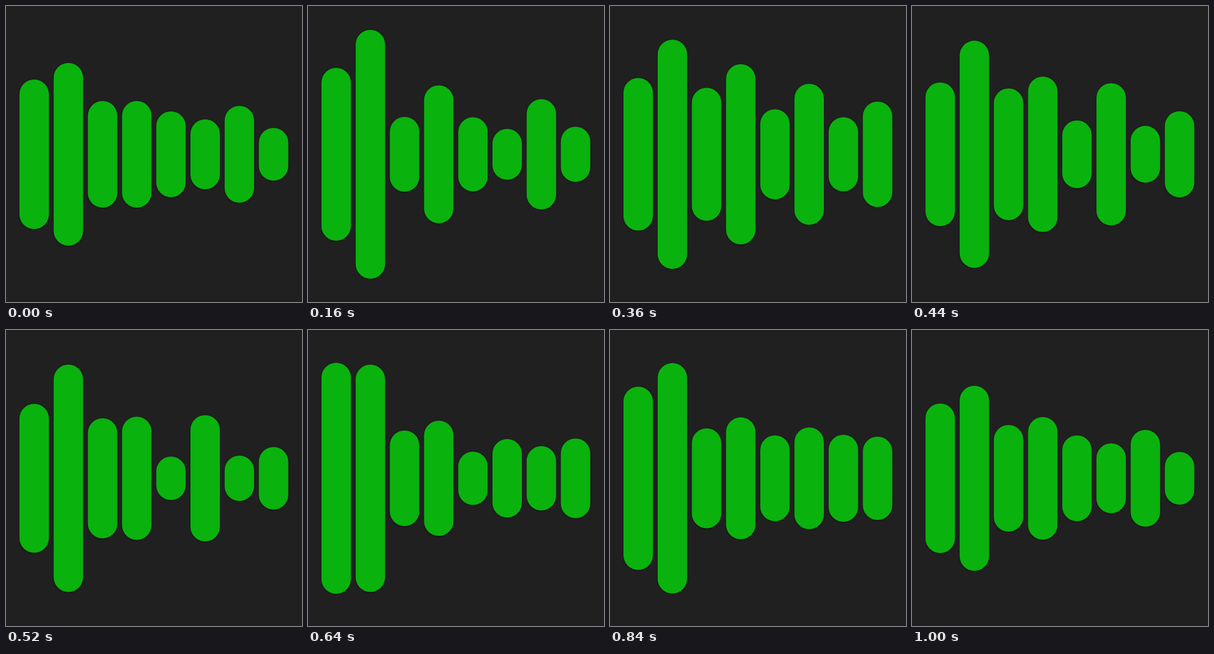
Write an HTML page that moves like this. It is 483 by 483 pixels and loops after 1.04 s.

```html
<!DOCTYPE html>
<html lang="en">
<head>
<meta charset="utf-8">
<title>Equalizer</title>
<style>
  html, body { margin: 0; width: 100%; height: 100%; overflow: hidden; background: #202020; }
  svg { display: block; width: 100%; height: 100%; }
  rect { fill: #0ab20e; }
  g { filter: drop-shadow(0 1.5px 1.5px rgba(0, 0, 0, .4)); }
</style>
</head>
<body>
<svg viewBox="0 0 483 483"><g id="bars"></g></svg>
<script>
const LOOP = 1040, STEP = 40;
const CENTER = 242, LEFT = 22, PITCH = 55.8, WIDTH = 48;

// Half-heights of each bar at the key times
const TIMES = [0, 160, 360, 520, 640, 840, 1000];
const LEVELS = [
  [122, 141, 124.5, 121.5, 188.5, 149.5, 122],
  [149, 203, 187, 185.5, 185.5, 188, 151],
  [87, 61, 108.5, 98, 78, 81.5, 87],
  [87, 112.5, 147, 100.5, 94, 99.5, 100],
  [70, 60.5, 73.5, 35.5, 43.5, 70, 70],
  [57, 41.5, 115, 103, 64, 83, 57],
  [79, 90, 60.5, 37, 52.5, 71, 79],
  [43, 45, 86, 51, 65, 68, 43]
];
const tracks = LEVELS.map(levels => levels.map((value, i) => ({ time: TIMES[i], value })));
tracks[0].splice(5, 0, { time: 690, value: 201 });

// Key at any index, wrapping around the loop
function keyAt(track, i) {
  const n = track.length, turn = Math.floor(i / n);
  const { time, value } = track[i - turn * n];
  return { time: time + turn * LOOP, value };
}

function slopeAt(track, i) {
  const a = keyAt(track, i - 1), b = keyAt(track, i + 1);
  return (b.value - a.value) / (b.time - a.time);
}

// Periodic cubic Hermite curve through the keys
function sample(track, time) {
  const i = track.filter(key => key.time <= time).length - 1;
  const a = keyAt(track, i), b = keyAt(track, i + 1);
  const span = b.time - a.time, u = (time - a.time) / span, v = 1 - u;
  return a.value * v * v * (1 + 2 * u) + b.value * u * u * (3 - 2 * u)
    + span * u * v * (slopeAt(track, i) * v - slopeAt(track, i + 1) * u);
}

const group = document.getElementById("bars");
const rects = tracks.map((_, i) => {
  const rect = document.createElementNS("http://www.w3.org/2000/svg", "rect");
  rect.setAttribute("x", LEFT + i * PITCH);
  rect.setAttribute("width", WIDTH);
  rect.setAttribute("rx", WIDTH / 2);
  return group.appendChild(rect);
});

function draw(time) {
  const t = Math.floor((time % LOOP) / STEP) * STEP;
  rects.forEach((rect, i) => {
    const half = sample(tracks[i], t);
    rect.setAttribute("y", CENTER - half);
    rect.setAttribute("height", half * 2);
  });
}

const start = performance.now();
function tick() {
  draw(performance.now() - start);
  requestAnimationFrame(tick);
}
tick();
</script>
</body>
</html>
```
